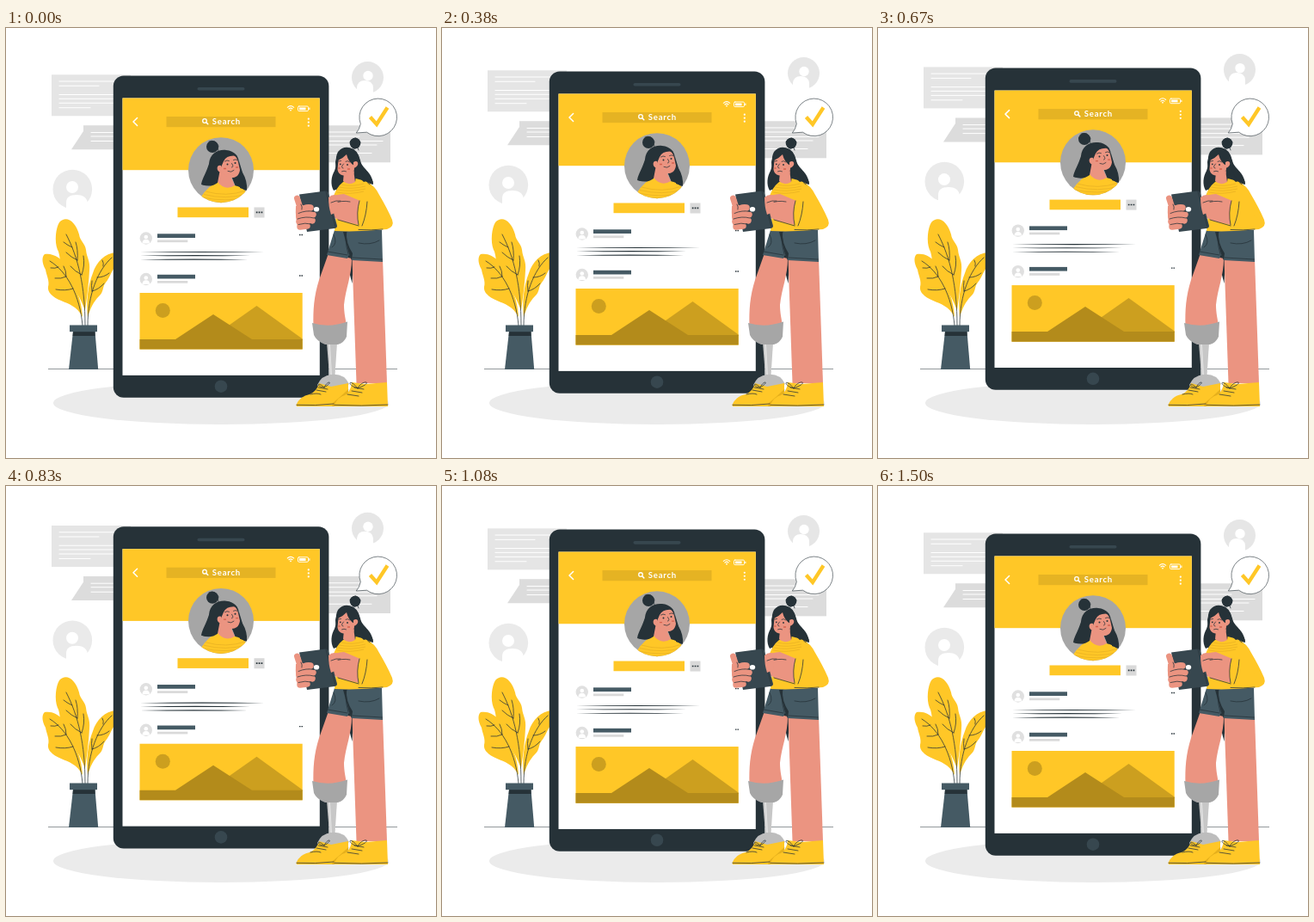
Animation, 500 px wide and 500 px high, one loop 1.54 s. Source, as an HTML page:

```html
<!DOCTYPE html>
<html lang="en">
<head>
<meta charset="utf-8">
<title>Profile page</title>
<style>
html, body { margin: 0; width: 100%; height: 100%; overflow: hidden; background: #fff; }
svg { display: block; width: 100vw; height: 100vh; }
text { font: 700 9.6px Lato, sans-serif; letter-spacing: .75px; }
.y { fill: #ffc727; } .d { fill: #263238; } .s { fill: #455a64; }
.p { fill: #eb9481; } .g { fill: #e0e0e0; } .w { fill: #fff; }
.ln { fill: none; stroke: #263238; stroke-width: .75; stroke-linecap: round; stroke-linejoin: round; }
.wl { fill: none; stroke: #fff; stroke-linecap: round; stroke-linejoin: round; }
.knit { fill: none; stroke: #dba520; stroke-width: .5; }
</style>
</head>
<body>
<svg viewBox="0 0 500 500">
  <defs>
    <clipPath id="disc"><circle cx="250" cy="165.200" r="38"/></clipPath>
    <clipPath id="bust"><path d="M222 206Q228 190 243 180L248 177Q256 188 265 183Q274 184 281 192V206Z"/></clipPath>
  </defs>

  <ellipse cx="250" cy="436" rx="195" ry="25" fill="#ebebeb"/>

  <!-- chat shapes behind -->
  <g class="bob">
    <rect x="53" y="54.300" width="92" height="48" fill="#e5e5e5"/>
    <path class="wl" stroke-width="1" d="M62 62H125M62 67.300H108M62 77.500H125M62 82.300H125M62 87.300H125M62 92.700H98"/>
    <path fill="#dcdcdc" d="M90 113.300H140V141.300H76L90 120Z"/>
    <path class="wl" stroke-width="1" d="M99 121.500H140M99 126H140M99 131.500H140"/>
    <rect x="360" y="113.300" width="87" height="43" fill="#dcdcdc"/>
    <path class="wl" stroke-width="1" d="M360 121H411M360 126H411M360 131.500H438M360 136H431M360 145.500H425"/>
    <circle cx="77.300" cy="187.500" r="22.800" fill="#eaeaea"/>
    <circle class="w" cx="77" cy="185" r="7"/>
    <path class="w" d="M70 211V203Q70 194 82 194Q95 194 95 206V211Z"/>
    <circle cx="420.500" cy="57.500" r="18.500" fill="#e6e6e6"/>
    <circle class="w" cx="421" cy="55.500" r="5.700"/>
    <path class="w" d="M408 77V69Q409 61 417 61Q426 61 427 69V77Z"/>
  </g>

  <path d="M49 396.500H455" stroke="#263238" stroke-width=".5"/>

  <!-- plant -->
  <g>
    <path class="y" d="M95 336C93 318 95 300 101 285C105 272 115 262 128 261V276C121 285 121 290 116 296C112 300 114 307 108 312C102 318 98 326 95 336Z"/>
    <path class="y" d="M89 336C82 323 73 321 64 317C54 313 48 307 49 301C51 294 47 288 46 281C41 272 42 265 45 263C53 261 66 267 73 281C79 290 78 297 82 306C86 314 88 324 89 336Z"/>
    <path class="y" d="M92 328C88 318 80 302 71 287C61 277 64 265 60 258C56 248 58 232 62 226C70 217 81 225 85 240C86 248 92 250 93 258C94 268 98 270 97 282C96 300 94 315 92 328Z"/>
    <path class="ln" stroke-width="1" d="M70 240C84 267 92 300 92 346M51 271C71 283 86 311 89 346M123 267C107 281 95 310 95 346"/>
    <path class="ln" d="M77 255Q72 253 67 249M83 270Q84 258 81 249M83 270Q76 267 70 261M88 287Q92 276 90 265M88 287Q80 283 75 277"/>
    <path class="ln" d="M61 278Q57 280 52 279M70 289Q70 282 67 277M70 289Q64 292 57 291M78 303Q69 306 58 304M113 277Q114 273 112 270M106 290Q114 290 120 285M100 306Q108 304 114 297M100 306Q99 299 100 294"/>
    <path class="s" d="M78 353H103.500L107.200 397H73Z"/>
    <path class="d" d="M78 353H103.500V358H77.600Z"/>
    <rect class="s" x="74" y="345.500" width="32" height="7.700"/>
  </g>

  <!-- tablet -->
  <g class="bob">
    <rect class="d" x="124.800" y="55.500" width="250.600" height="374.200" rx="12"/>
    <rect x="222.500" y="69" width="55" height="3.600" rx="1.800" fill="#37474f"/>
    <circle cx="250" cy="416.700" r="7.300" fill="#37474f"/>
    <rect class="w" x="135.500" y="81.500" width="229.300" height="322.400"/>
    <rect class="y" x="135.500" y="81.500" width="229.300" height="83.700"/>
    <path class="wl" stroke-width="1.100" d="M327.300 92.300Q331 89 334.700 92.300M328.900 94Q331 92.200 333.100 94"/>
    <circle class="w" cx="331" cy="95.600" r=".9"/>
    <rect class="wl" x="339.500" y="91" width="12" height="5.600" rx="1.300" stroke-width=".9"/>
    <path class="w" d="M341 92.400H348.500V95.200H341ZM352.300 92.600H353.400V95H352.300Z"/>
    <path class="wl" stroke-width="1.500" d="M152.600 104.500L148 109L152.600 113.500"/>
    <rect x="186.500" y="103" width="127" height="12.200" fill="#e5b323"/>
    <circle class="wl" cx="231" cy="108" r="2.300" stroke-width="1.300"/>
    <path class="wl" stroke-width="1.500" d="M232.900 109.900L234.800 111.800"/>
    <text class="w" x="239.800" y="112.300">Search</text>
    <g class="w"><circle cx="351.800" cy="105.700" r="1.100"/><circle cx="351.800" cy="109.700" r="1.100"/><circle cx="351.800" cy="113.700" r="1.100"/></g>

    <!-- portrait -->
    <circle cx="250" cy="165.200" r="38" fill="#a6a6a6"/>
    <g clip-path="url(#disc)">
      <path class="d" d="M236 158C237 146 246 141 256 142C266 143 271 149 271 158C274 168 279 176 280 188Q274 190 268 187L262 172L248 172C243 181 236 185 227 182C228 175 233 168 236 158Z"/>
      <path class="y" d="M222 206Q228 190 243 180L248 177Q256 188 265 183Q274 184 281 192V206Z"/>
      <path clip-path="url(#bust)" class="knit" d="M232 190Q256 197 279 189M230 193.500Q256 200 280 193M228 197Q256 203 280 196.500M228 200.500Q256 206 280 200"/>
      <path class="p" d="M247 165L246 179Q255 190 266 183L261 172Z"/>
      <path class="d" d="M267 160Q272 172 272 186L280 189Q281 178 275 168L271 155Z"/>
      <path class="p" d="M252 148C260 144 268 147 270 156L272 165C271 173 265 175 260 174C252 172 248 167 248 158Z"/>
      <path class="d" d="M243 148Q256 139 269 149Q257 147 253 155Q250 161 248.500 167L246 180Q238 186 228 182Q236 168 237 155Z"/>
      <path class="p" d="M250 160C244 158 244 168 251 168Z"/>
      <circle class="d" cx="257.500" cy="158.500" r="1"/><circle class="d" cx="266.500" cy="157" r="1"/>
      <path class="ln" d="M254.500 155Q257 153 259.500 154.500M264.500 153.500Q267 152 269 153.500M262.500 157.500Q265.500 161.500 262.500 162M258 166.500Q262 168.500 265 165.500"/>
      <path d="M253 163.500H256M267 162H270" stroke="#d4624f" stroke-width="1.300"/>
    </g>
    <circle class="d" cx="240" cy="138" r="7"/>
    <path class="ln" d="M236 132Q243 129 247 137Q245 144 250 145"/>

    <rect class="y" x="199.500" y="208.500" width="82.500" height="11.700"/>
    <rect x="288.500" y="208.500" width="12" height="12" fill="#d9d9d9"/>
    <path d="M290.800 214.400h1.700m1.200 0h1.700m1.200 0h1.700" stroke="#263238" stroke-width="1.600"/>
    <g id="posts"></g>
    <path class="d" d="M156 260.500Q228 259.300 300 260.500Q228 261.600 156 260.500ZM156 264.700Q220 263.500 284 264.700Q220 265.800 156 264.700ZM156 269.200Q218 268 281 269.200Q218 270.300 156 269.200Z"/>
    <rect class="y" x="155.500" y="308" width="189.200" height="65.600"/>
    <circle cx="182.300" cy="328.500" r="8.500" fill="#cc9f1f"/>
    <path fill="#cc9f1f" d="M236 362L291.500 323L344.700 361.500V363H236Z"/>
    <path fill="#b38b1b" d="M155.500 362H197L241 333L286 362H344.700V373.600H155.500Z"/>
  </g>

  <!-- speech bubble -->
  <path d="M412.300 111.500A21.800 21.800 0 1 1 419.500 121.200L407.300 122Q411 118 412.300 111.500Z" fill="#fff" stroke="#263238" stroke-width=".6"/>
  <path d="M423.500 103.500L431 112L443.500 92.500" fill="none" stroke="#ffc727" stroke-width="4.300"/>

  <!-- standing figure -->
  <g>
    <path class="d" d="M393 260L404 266L402.500 297Z"/>
    <path class="p" d="M375 262L402 268C402 288 395 303 393 322C393 332 395 338 396 347L376 351L357.500 347C357 328 358 312 364 293Z"/>
    <path class="p" d="M402.500 268H438L443 413H407.500Z"/>
    <path d="M373 366H385L382.500 404H376Z" fill="#c7c7c7"/>
    <path d="M376 368L378 403" stroke="#e0e0e0" stroke-width="2"/>
    <path d="M356 343Q376 349 397 341.500L396 359Q393 366 386 368H371Q361 364 358 357Z" fill="#a6a6a6"/>
    <path d="M362 415Q367 404 378 403Q393 401 399 414L394 418H364Z" fill="#bdbdbd"/>

    <path class="y" d="M337.500 438Q342 428 353 426Q361 423 364 413L378 417L398 413V432L388 440H338Z"/>
    <path fill="#e6b01c" d="M380 436Q392 426 398 420V430L388 440H379Z"/>
    <path class="y" d="M382 438Q386 429 394 427Q401 423 402 412L418 414L443 412L444 440H382Z"/>
    <path class="ln" d="M338 438.300Q360 439.500 381 437M382 438.300Q414 440 444 438M354 426Q362 424 366 426M361 421L372 423M363 418L374 420M370 418C362 410 360 417 370 418C374 409 382 411 370 418M397 426L410 428M402 422L414 424M405 418L416 420M409 419C399 406 395 415 409 419C414 408 430 411 409 419"/>

    <path class="s" d="M382 235H437L438 272L402 270L399 263L397 268L373 264Z"/>
    <path class="ln" d="M396 237Q393 244 398 263M381 240Q386 251 379 255M410 250Q424 253 434 247M374 260L397 264M403 267L437 269"/>
    <path class="d" d="M392 237L399 263L402 270L403 262Q395 250 396 237Z"/>

    <!-- hair behind, sweater -->
    <path class="d" d="M386 144C382 151 385 160 382 166C378 173 377 182 381 189Q390 186 395 180H412Q421 180 427 182C427 172 418 170 414 163L410 149C405 138 393 135 386 144Z"/>
    <path class="y" d="M380 199Q383 186 392 179L403 174L418 178Q429 183 434 194Q444 211 449 223Q452 231 443 234Q410 237.500 382 236L384 215Z"/>
    <path class="knit" d="M390 182Q402 185 416 181M387 185Q402 188 418 184M386 188Q400 191 418 187M385 191Q400 194 416 190"/>
    <path class="p" d="M393 168L392 178Q398 184 406 179L406 166Z"/>
    <path class="p" d="M387 148C394 143 405 146 408 154C410 162 403 168 398 171C391 173 386 170 385.500 164Z"/>
    <path class="d" d="M383 156Q386 140 400 139.500Q409 141 412 154C414 164 425 166 427 181Q421 177 416 179Q409 173 408 166L406 179Q404 170 405 160Q398 156 396 147Q391 152 386 154L384 164Z"/>
    <path class="p" d="M404 156C410 152 412 161 404 163Z"/>
    <circle class="d" cx="406" cy="134" r="6.300"/>
    <path class="ln" d="M400 132Q407 123 412 133Q411 139 402 142M410 142Q409 135 403 140M412 166Q416 177 423 182M386 172Q381 180 384 188"/>
    <circle class="d" cx="388.800" cy="158.300" r=".9"/><circle class="d" cx="397" cy="159" r=".9"/>
    <path class="ln" d="M386.500 155L389.500 154.500M395 155.200Q397.500 153.700 399.500 155.800M392.500 158Q388.500 162.500 392 163M390.500 166.800Q393 165.500 395.500 166.800"/>
    <path d="M386.500 163H388.500M397 164H400" stroke="#d4624f" stroke-width="1.300"/>

    <!-- arm, device, hand -->
    <path class="p" d="M376 199Q383 193 393 193L412 201L411 229L389 224L379 219Z"/>
    <path class="y" d="M411 201L420 200L438 219Q448 223 447 232L410 229Q407 215 411 201Z"/>
    <path class="ln" d="M411 201Q407 215 410 229M420 202Q419 218 414 230M381 204Q390 200 400 202M386 223L410 230M410 234.500Q425 235.500 438 234"/>
    <path d="M341 193.500L371.500 189.500Q374 189.500 375 192L385 230Q385 232.500 382 233L350 237Z" fill="#37474f"/>
    <path class="ln" d="M372 190L383 231"/>
    <ellipse class="w" cx="361" cy="210.800" rx="3.200" ry="2.800"/>
    <path class="p" d="M337 207L345 206L352 213L353 230L340 233Q336 222 337 207Z"/>
    <g fill="none" stroke="#eb9481" stroke-linecap="round">
      <path stroke-width="7" d="M338.500 198L343 212"/>
      <path stroke-width="7.500" d="M341 213Q348 208 354 209M341 219Q350 215 357 217M341 225.500Q350 222 356 224M342 231L350 230"/>
    </g>
    <path class="ln" d="M340 215.500Q349 211.500 358 213.500M339 222Q349 218.500 358 221M340 228.500Q348 226 355 228M343 205Q345 208 344 211"/>
    <path class="p" d="M375 197Q380 192 386 195L385 214L378 217Q375 208 375 197Z"/>
    <path class="ln" d="M378 203Q384 200 389 201"/>
  </g>
</svg>
<script>
const LOOP = 1540, FPS = 24, CYCLE = 1500;
const bobs = document.querySelectorAll('.bob');

const post = y => `
  <circle class="g" cx="162.800" cy="${y}" r="7.200"/>
  <circle class="w" cx="162.800" cy="${y - 1.5}" r="2.300"/>
  <path class="w" d="M158.500 ${y + 6}q0 -4.700 4.300 -4.700t4.300 4.700z"/>
  <rect class="s" x="176" y="${y - 5.2}" width="44" height="4.700"/>
  <rect x="176" y="${y + 2}" width="35.300" height="2.700" fill="#d9d9d9"/>
  <path d="M341 ${y - 4}h1.500m1 0h1.500" stroke="#263238" stroke-width="1.300"/>`;
document.getElementById('posts').innerHTML = post(244.5) + post(292);

// 24 steps a second, each starting on a 10 ms tick
function stepAt(t) {
  let i = Math.floor(t * FPS / 1000) + 1;
  while (Math.round(i * 100 / FPS) * 10 > t) i--;
  return i;
}

// straight rise and fall over one cycle
function draw(t) {
  const p = (stepAt(t) * 1000 / FPS + 23) % CYCLE / CYCLE;
  const y = 0.3 - 10 * (1 - Math.abs(2 * p - 1));
  bobs.forEach(b => b.setAttribute('transform', `translate(0 ${y.toFixed(2)})`));
}

const start = performance.now();
function tick() {
  draw((performance.now() - start) % LOOP);
  requestAnimationFrame(tick);
}
tick();
</script>
</body>
</html>
```
